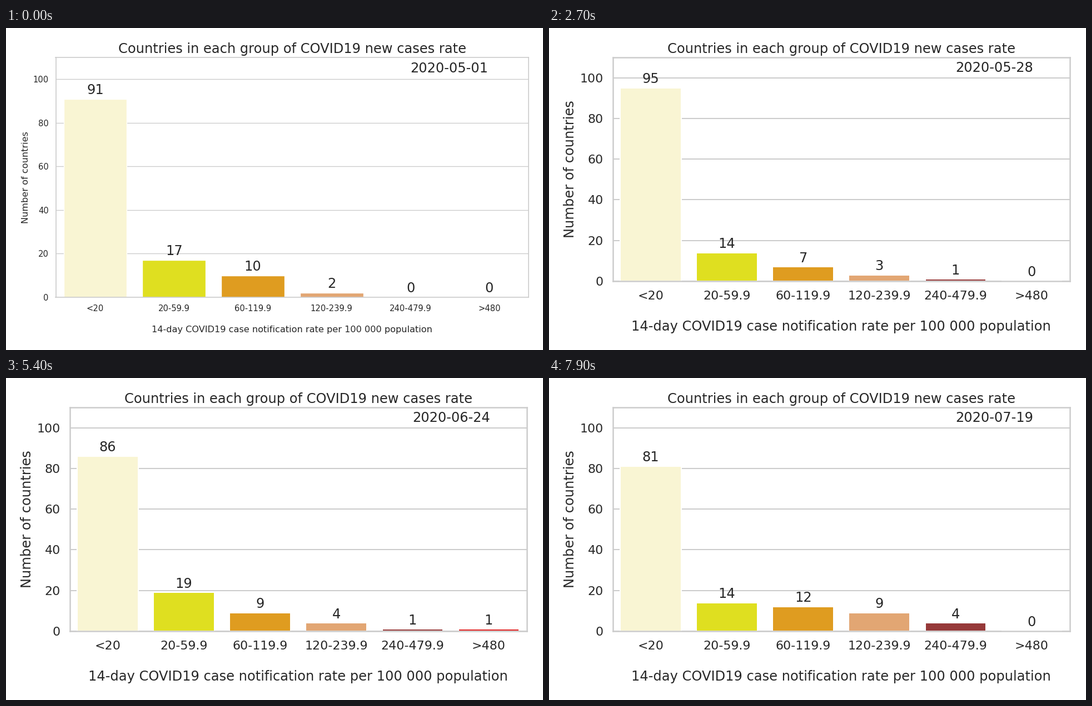
These frames come from a looping animation (966x580 px, 8000 ms). A matplotlib script:

```python
import colorsys

import matplotlib.pyplot as plt
import numpy as np
from matplotlib.animation import FuncAnimation
from matplotlib.colors import to_rgb

W, H, DPI = 966, 580, 100
FRAMES, INTERVAL = 80, 100
UNIT = 0.966          # size of one style point
INK, RULE = "0.15", "0.8"

GROUPS = ["<20", "20-59.9", "60-119.9", "120-239.9", "240-479.9", ">480"]
COLORS = ["lemonchiffon", "yellow", "orange", "sandybrown", "brown", "red"]
START = np.datetime64("2020-05-01")
COUNTRIES = 120

# Larger groups drift between these days, smaller ones change in steps.
DAYS = [0, 15, 27, 43, 54, 69, 79]
DRIFTS = [[17, 17, 14, 20, 19, 15, 14],
          [10, 7, 7, 6, 9, 14, 12]]
STEPS = [
    ([0, 4, 11, 14, 30, 33, 36, 40, 50, 57, 62, 67, 72, 77],
     [2, 3, 4, 3, 2, 3, 4, 5, 4, 5, 6, 7, 8, 9]),
    ([0, 23, 60, 66, 74, 76, 78], [0, 1, 2, 3, 2, 3, 4]),
    ([0, 50, 58], [0, 1, 0]),
]


def muted(color, amount=0.75):
    h, l, s = colorsys.rgb_to_hls(*to_rgb(color))
    return colorsys.hls_to_rgb(h, l, s * amount)


def counts(day):
    rest = [int(round(np.interp(day, DAYS, vals))) for vals in DRIFTS]
    rest += [vals[np.searchsorted(days, day, side="right") - 1]
             for days, vals in STEPS]
    return [COUNTRIES - sum(rest)] + rest


class Panel:
    """Bar chart filling a pixel box, styled at a given scale."""

    def __init__(self, fig, left, top, right, bottom, scale):
        k = UNIT * scale
        big = 18 * UNIT
        ax = fig.add_axes([left / W, 1 - bottom / H,
                           (right - left) / W, (bottom - top) / H])
        self.ax = ax
        ax.set(xlim=(-0.5, 5.5), ylim=(0, 110),
               yticks=range(0, 101, 20))
        ax.set_xticks(range(6), GROUPS)
        ax.set_axisbelow(True)
        ax.grid(axis="y", color=RULE, lw=k, solid_capstyle="round")
        ax.tick_params(labelsize=11 * k, length=6 * k, pad=3.5 * UNIT,
                       labelcolor=INK, bottom=False, left=False)
        for spine in ax.spines.values():
            spine.set(color=RULE, linewidth=1.25 * k)

        label = dict(fontsize=12 * k, color=INK, labelpad=4 * UNIT)
        ax.set_xlabel("\n14-day COVID19 case notification rate"
                      " per 100 000 population", **label)
        ax.set_ylabel("Number of countries", **label)
        ax.set_title("Countries in each group of COVID19 new cases rate",
                     fontsize=big, color=INK, pad=6 * UNIT)

        self.bars = ax.bar(range(6), [0] * 6, 0.8, lw=k, edgecolor="white",
                           color=[muted(c) for c in COLORS])
        self.labels = [
            ax.annotate("", (x, 0), xytext=(0, 8.8 * 72 / DPI),
                        textcoords="offset points", ha="center",
                        va="baseline", fontsize=big, color=INK)
            for x in range(6)]
        self.date = ax.text(4, 103, "", fontsize=big, color=INK)

    def show(self, day):
        self.date.set_text(str(START + day))
        for x, n in enumerate(counts(day)):
            self.bars[x].set_height(n)
            self.labels[x].xy = (x, n)
            self.labels[x].set_text(str(n))


plt.rcParams["font.family"] = "DejaVu Sans"
fig = plt.figure(figsize=(W / DPI, H / DPI), dpi=DPI, facecolor="white")
small = Panel(fig, 89.5, 53, 940.3, 485, 1)
large = Panel(fig, 114.5, 53, 937, 456, 1.5)


def update(day):
    # The first day alone uses the small style.
    first = day == 0
    small.ax.set_visible(first)
    large.ax.set_visible(not first)
    (small if first else large).show(day)
    return []


anim = FuncAnimation(fig, update, frames=FRAMES, interval=INTERVAL,
                     init_func=lambda: update(0), repeat=True,
                     repeat_delay=0, blit=False)
plt.show()
```
